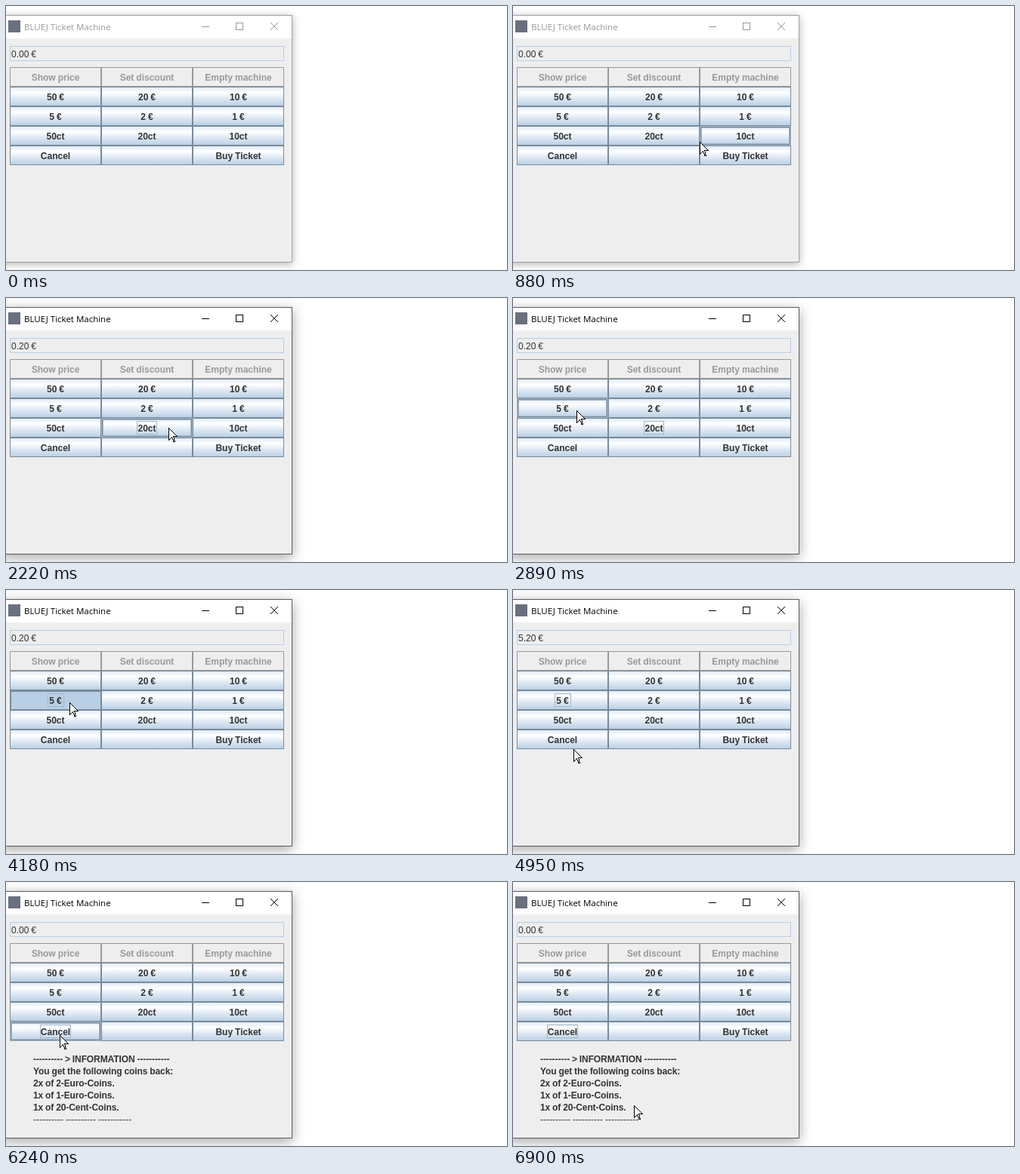
These frames come from a looping animation (663x350 px, 8 s). An HTML page:

```html
<!DOCTYPE html>
<html lang="en">
<head>
<meta charset="utf-8">
<title>Ticket Machine</title>
<style>
  html, body { margin: 0; width: 100%; height: 100%; overflow: hidden; background: #fff; }
  #stage { position: relative; width: 663px; height: 350px; overflow: hidden; }
  #win {
    position: absolute; left: -8px; top: 12px; width: 385px; height: 326px;
    border: 1px solid #a3a3a3; background: linear-gradient(#fff 30px, #eee 30px);
    box-shadow: 0 2px 10px rgba(0, 0, 0, .32);
  }
  #win.active { border-color: #5c5c5c; box-shadow: 0 4px 16px rgba(0, 0, 0, .36); }
  svg { position: absolute; left: 0; top: 0; }
  text { font: 12px "Liberation Sans", Arial, sans-serif; fill: #333; white-space: pre; word-spacing: -.33px; }
  .bold { font-weight: bold; }
  .off { fill: #999; }
  #title { font: 11.5px "Open Sans", "Noto Sans", sans-serif; word-spacing: 0; }
  #info text { letter-spacing: -.09px; }
  #info text:last-child { font-weight: normal; letter-spacing: 0; }
  rect, path { shape-rendering: crispEdges; }
  .smooth { shape-rendering: auto; }
</style>
</head>
<body>
<div id="stage">
  <div id="win"></div>
  <svg id="ui" width="663" height="350">
    <defs>
      <linearGradient id="ocean" x2="0" y2="1">
        <stop offset="0" stop-color="#dde8f3"/>
        <stop offset=".3" stop-color="#fff"/>
        <stop offset=".6" stop-color="#dde8f3"/>
        <stop offset="1" stop-color="#b8cfe5"/>
      </linearGradient>
    </defs>
    <rect x="3" y="19" width="16" height="16" fill="#68717d"/>
    <text id="title" x="24" y="32">BLUEJ Ticket Machine</text>
    <g id="controls" fill="none">
      <path d="M259 27.5h10M304.5 22.5h9v9h-9z"/>
      <path class="smooth" d="M350 22l10 10M360 22l-10 10"/>
    </g>
    <rect x="5.5" y="53.5" width="362" height="19" fill="#eee" stroke="#b8cfe5"/>
    <text id="amount" x="7" y="68"></text>
    <g id="buttons"></g>
    <g id="info"></g>
    <path id="cursor" fill="#fff" stroke="#000"
      d="M.5 .5V16.5L4.5 12.5L7 18.5H8.5L6.5 11.5H11.5Z"/>
  </svg>
</div>
<script>
const LOOP = 8000, COL = 121, ROW = 26;
const byId = id => document.getElementById(id);

function add(parent, tag, attrs, text) {
  const el = document.createElementNS('http://www.w3.org/2000/svg', tag);
  for (const key in attrs) el.setAttribute(key, attrs[key]);
  if (text) el.textContent = text;
  return parent.appendChild(el);
}

const frame = (parent, x, y, inset, stroke) => add(parent, 'rect', {
  x: x + inset + .5, y: y + inset + .5,
  width: COL - 1 - 2 * inset, height: ROW - 1 - 2 * inset, fill: 'none', stroke
});

const show = (el, on) => { el.style.display = on ? '' : 'none'; };

const labels = [
  'Show price', 'Set discount', 'Empty machine',
  '50 €', '20 €', '10 €', '5 €', '2 €', '1 €',
  '50ct', '20ct', '10ct', 'Cancel', '', 'Buy Ticket'
];
const focusWidths = { '20ct': 26, '5 €': 21, 'Cancel': 40 };

const buttons = labels.map((label, i) => {
  const x = 5 + i % 3 * COL, y = 81 + Math.floor(i / 3) * ROW;
  const enabled = i > 2, mid = x + COL / 2;
  const g = add(byId('buttons'), 'g', {});
  const face = add(g, 'rect', { x, y, width: COL, height: ROW, fill: enabled ? 'url(#ocean)' : '#eee' });
  frame(g, x, y, 0, enabled ? '#7a8a99' : '#999');
  const hover = add(g, 'g', {});
  ['#a3b8cc', '#7a8a99', '#a3b8cc'].forEach((color, inset) => frame(hover, x, y, inset, color));
  const sunk = add(g, 'path', { d: `M${x + 1} ${y + 1.5}h119M${x + 1.5} ${y + 1}v24`, stroke: '#7a8a99' });
  const w = focusWidths[label] || 0;
  const focus = add(g, 'rect', {
    x: Math.floor(mid - w / 2) + .5, y: y + 4.5, width: w, height: 17, fill: 'none', stroke: '#a3b8cc'
  });
  add(g, 'text', { x: mid, y: y + 18, 'text-anchor': 'middle', class: enabled ? 'bold' : 'bold off' }, label);
  return { label, x, y, enabled, face, hover, sunk, focus };
});

[
  '---------- > INFORMATION -----------',
  'You get the following coins back:',
  '2x of 2-Euro-Coins.',
  '1x of 1-Euro-Coins.',
  '1x of 20-Cent-Coins.',
  '---------- ---------- -----------'
].forEach((line, i) => add(byId('info'), 'text', { x: 36, y: 239 + i * 16, class: 'bold' }, line));

// Pointer path: time, x, y, eased arrival
const path = [
  [320, 555, 338], [500, 482, 266], [700, 345, 210], [820, 273, 190],
  [880, 247, 180], [1000, 227, 175], [1140, 215, 172],
  [2200, 215, 172], [2890, 84, 149, 1],
  [4490, 84, 149], [4690, 80, 212, 1],
  [4930, 80, 212], [4950, 80, 211], [5150, 79, 203, 1],
  [6120, 79, 203], [6240, 71, 203, 1],
  [6430, 71, 203], [6900, 160, 296, 1]
];

// Clicks: press time, release time, button, amount afterwards
const clicks = [
  [1340, 1500, '20ct', '0.20 €'],
  [4070, 4200, '5 €', '5.20 €'],
  [5490, 5640, 'Cancel', '0.00 €']
];

function pointerAt(t) {
  const next = path.findIndex(p => p[0] > t);
  if (next < 1) return next ? path[path.length - 1].slice(1, 3) : null;
  const [t0, x0, y0] = path[next - 1], [t1, x1, y1, eased] = path[next];
  let k = (t - t0) / (t1 - t0);
  if (eased) k = k * k * (3 - 2 * k);
  return [Math.round(x0 + (x1 - x0) * k), Math.round(y0 + (y1 - y0) * k)];
}

function draw(t) {
  const tip = pointerAt(t), active = t >= 1320;
  show(byId('cursor'), tip);
  if (tip) byId('cursor').setAttribute('transform', `translate(${tip})`);

  byId('win').className = active ? 'active' : '';
  byId('title').style.fill = byId('controls').style.stroke = active ? '#000' : '#999';

  let amount = '0.00 €', focused, pressed;
  for (const [down, up, label, result] of clicks) {
    if (t >= down) focused = label;
    if (t >= down && t < up) pressed = label;
    if (t >= up) amount = result;
  }
  byId('amount').textContent = amount;
  show(byId('info'), t >= 5640);

  for (const b of buttons) {
    if (!b.enabled) { [b.hover, b.sunk, b.focus].forEach(el => show(el, false)); continue; }
    const over = tip && tip[0] >= b.x && tip[0] < b.x + COL && tip[1] >= b.y && tip[1] < b.y + ROW;
    const down = b.label === pressed;
    show(b.hover, over && !down);
    show(b.sunk, down);
    show(b.focus, b.label === focused);
    b.face.setAttribute('fill', down ? '#b8cfe5' : 'url(#ocean)');
  }
}

const start = performance.now();
function tick() {
  draw((performance.now() - start) % LOOP);
  requestAnimationFrame(tick);
}
tick();
</script>
</body>
</html>
```
